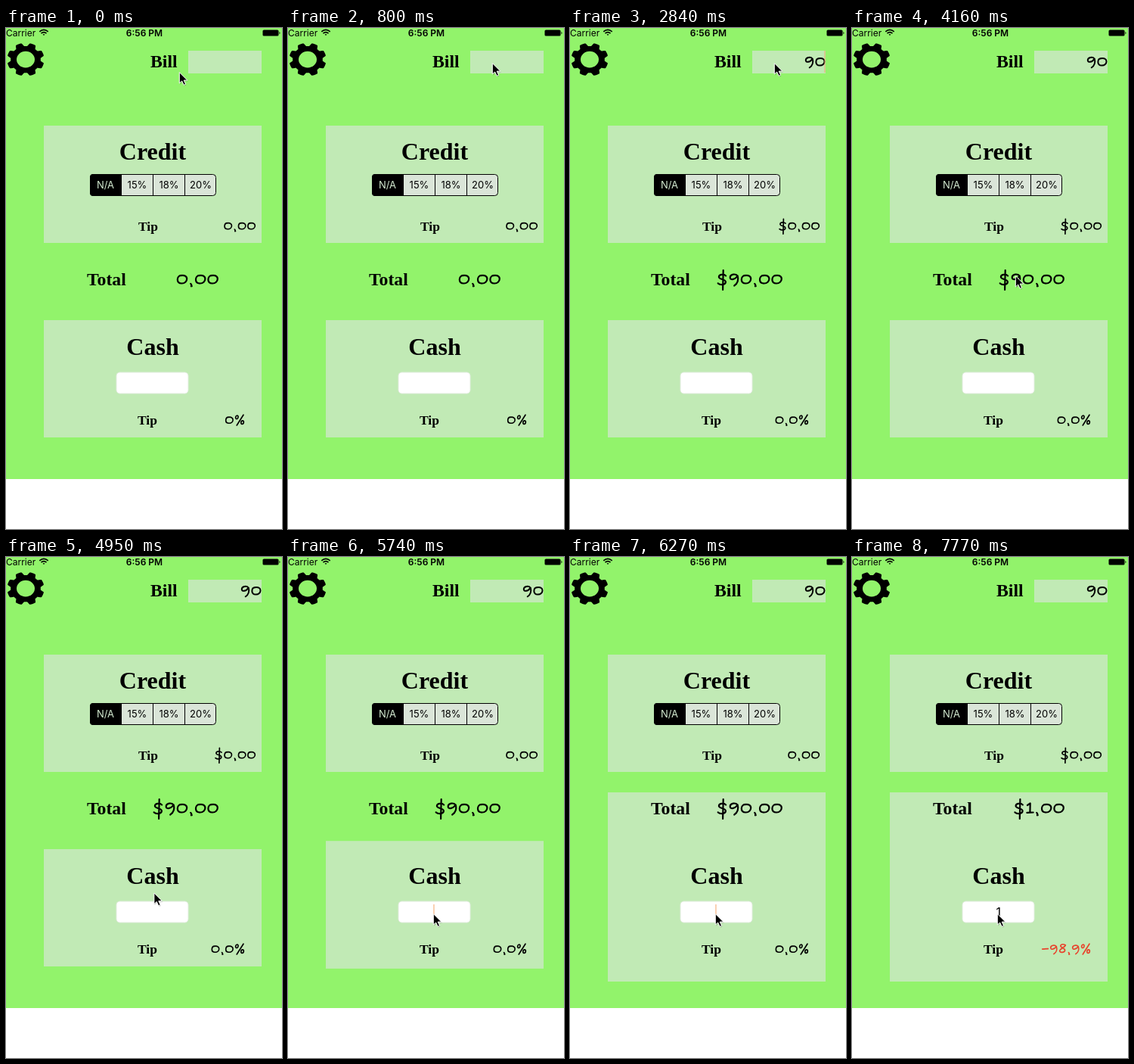
An HTML page for the animation above (8 s loop, 365 by 662 pixels).

```html
<!DOCTYPE html>
<html lang="en">
<head>
<meta charset="utf-8">
<title>Tip calculator</title>
<style>
  html, body { margin: 0; width: 100%; height: 100%; overflow: hidden; background: #fff; }
  svg { display: block; }
  text { font-family: Inter, Roboto, sans-serif; font-size: 12px; }
  .mid { text-anchor: middle; }
  .seg text { font-size: 13px; }
  .title { font: bold 23.7px "Liberation Serif", serif; }
  .big { font-size: 32px; }
  .small { font-size: 17.5px; }
  .hand { fill: none; stroke: #000; stroke-linecap: round; stroke-linejoin: round; }
</style>
</head>
<body>
<svg width="365" height="662" viewBox="0 0 365 662">
  <rect width="365" height="596" fill="#92f36b"/>

  <text x="0" y="10.5">Carrier</text>
  <g fill="none" stroke="#000" stroke-width="1.7">
    <path d="M44.3 4.8Q50 -.2 55.7 4.8M46.5 7.2Q50 4.2 53.5 7.2"/>
    <path d="M48.6 8.6L50 10L51.4 8.6Q50 7.6 48.6 8.6Z" fill="#000" stroke="none"/>
  </g>
  <text class="mid" x="183" y="10.5" font-weight="600">6:56 PM</text>
  <rect x="339.5" y="2.5" width="21" height="8" rx="1.6"/>
  <path d="M361.5 4.7Q363.5 6.5 361.5 8.3Z"/>

  <path id="gear" fill-rule="evenodd"/>

  <g fill="#c1eab5">
    <rect x="241" y="30" width="97" height="30"/>
    <rect x="50" y="129" width="288" height="155"/>
    <rect id="panel" x="50" width="288"/>
  </g>

  <text class="title" x="191" y="52">Bill</text>
  <text class="title big mid" x="194" y="174">Credit</text>
  <text class="title small" x="175" y="268">Tip</text>
  <text class="title" x="107" y="339.5">Total</text>
  <text class="title big mid" x="194" y="432">Cash</text>
  <text class="title small" x="174" y="524">Tip</text>

  <rect x="111.5" y="193.5" width="166" height="28" rx="4" fill="#dae5d8" stroke="#000"/>
  <path d="M153 193V222H115Q111 222 111 218V197Q111 193 115 193ZM194 193h1v29h-1zM236 193h1v29h-1z"/>
  <g class="mid seg">
    <text x="131.5" y="212" fill="#d3ead0">N/A</text>
    <text x="173.5" y="212">15%</text>
    <text x="215.5" y="212">18%</text>
    <text x="257.5" y="212">20%</text>
  </g>

  <rect x="146" y="455" width="95" height="28" rx="4.5" fill="#fff" stroke="#e0ecdd"/>
  <text id="cash" class="mid" x="193.7" y="475" style="font-size:16px"></text>

  <g id="bill" class="hand" role="text"/>
  <g id="tip" class="hand" role="text"/>
  <g id="total" class="hand" role="text"/>
  <g id="percent" class="hand" role="text"/>

  <rect id="billCaret" x="336.3" y="30" width="1.4" height="29" fill="#f2a76b"/>
  <rect id="cashCaret" y="459" width="1.3" height="20" fill="#f7b98c"/>

  <g id="cursor">
    <path d="M1 2V16.5L4.5 13.3L7 18.5L9.4 17.5L7 12.5H12Z" opacity=".18"/>
    <path d="M.3 .6V15L3.7 12L6.1 17.3L8.6 16.2L6.2 11.1H10.8Z" stroke="#fff"/>
  </g>
</svg>
<script>
const LOOP = 8000;
const $ = id => document.getElementById(id);
const clamp = v => Math.max(0, Math.min(1, v));
const part = (t, a, b) => clamp((t - a) / (b - a));
const mix = (a, b, p) => a + (b - a) * p;

// Handwritten glyphs: [advance, stroke path], baseline at y = 0
const glyphs = {
  0: [16.4, 'M7 -11.6C3.5 -11.5 1.8 -8.8 1.8 -6C1.8 -2.6 4.4 -1 7.5 -1C11.4 -1 14.2 -3.8 14.2 -7C14.2 -10.6 10.5 -12.6 5.8 -11.2'],
  1: [12, 'M2.5 -10.5L6.3 -13L6 -1M2 -.6L10.3 -1'],
  8: [15, 'M12 -13.5C8 -16 3.5 -14.5 4 -11.5C4.5 -9 11.5 -8 11.5 -4.2C11.5 -.5 3 .5 2.4 -3C2 -7 11.5 -9 12.5 -13.5'],
  9: [15.3, 'M11.8 -11C9 -14.5 2.2 -13 2 -9C1.8 -5 8 -5.2 12 -11C13.5 -6 12 -.5 7.5 2'],
  '.': [7.8, 'M2.8 -.6L3.8 .6L3.6 2.8L4.4 2.6'],
  '-': [14, 'M1.5 -6.5L11.5 -7'],
  '$': [15.6, 'M12 -11C9 -14 2.6 -13 2.8 -9.3C3 -6 11.8 -7 11.8 -3C11.8 1 5 1.6 1.6 -1.2M8.6 -18.5L8 7.5'],
  '%': [20, 'M5 -14.5C2 -14 1.5 -8.5 4.2 -8.5C7.2 -8.5 8 -14.5 5 -14.5M16 -15.5L4.5 2.6M14.5 -5.5C11.5 -5.5 10.8 .5 13.6 .5C17 .5 17.6 -5.5 14.5 -5.5']
};

// Right-aligned handwriting, rebuilt only when its text changes
function write(id, text, right, base, scale, color = '#000') {
  const g = $(id);
  if (g.getAttribute('aria-label') === text) return;
  g.setAttribute('aria-label', text);
  const chars = [...text].map(c => glyphs[c]);
  const width = chars.reduce((sum, c) => sum + c[0], 0);
  let x = 0;
  g.innerHTML = chars.map(([adv, d]) => {
    const s = `<path d="${d}" transform="translate(${x})"/>`;
    x += adv;
    return s;
  }).join('');
  g.setAttribute('transform', `translate(${right - width * scale} ${base}) scale(${scale})`);
  g.style.stroke = color;
  g.style.strokeWidth = 2.2;
}

function gearPath() {
  let d = '';
  for (let i = 0; i < 200; i++) {
    const a = i * Math.PI / 100;
    const r = 22.2 + 2.4 * Math.max(-1, Math.min(1, .5 - 2.2 * Math.cos(8 * a)));
    d += `${i ? 'L' : 'M'}${(26 + r * Math.cos(a)).toFixed(2)} ${(41.6 + .89 * r * Math.sin(a)).toFixed(2)}`;
  }
  return d + 'ZM14 41.6a12 10.8 0 1 0 24 0a12 10.8 0 1 0 -24 0Z';
}
$('gear').setAttribute('d', gearPath());

// Pointer moves: start, end, target x, target y
const start = [229, 58];
const moves = [
  [140, 800, 270, 46],
  [2870, 3370, 226, 187],
  [3590, 3990, 216, 327],
  [4170, 4430, 203, 386],
  [4740, 5230, 192, 471]
];
function pointer(t) {
  let [x, y] = start;
  for (const [a, b, tx, ty] of moves) {
    const p = 1 - (1 - part(t, a, b)) ** 2;
    x = mix(x, tx, p);
    y = mix(y, ty, p);
  }
  return `translate(${x} ${y})`;
}

// Caret spans: visible from a, fading out between b and c
const billBlinks = [[1250, 1780, 1870], [2220, 2800, 2930], [3330, 3810, 3990], [4390, 4780, 4880], [5290, 5640, 5650]];
const cashBlinks = [[5650, 6400, 6520], [6880, 7560, 7770]];
const blink = (spans, t) => {
  const s = spans.find(([a, , c]) => t >= a && t < c);
  return s ? 1 - part(t, s[1], s[2]) : 0;
};

function draw(t) {
  const typed = t >= 2220, full = t >= 2300, paid = t >= 6880;
  write('bill', full ? '90' : typed ? '9' : '', 338.5, 50.5, .9);
  write('tip', typed && (t < 5650 || paid) ? '$0.00' : '0.00', 331, 266.5, .76);
  write('total', paid ? '$1.00' : full ? '$90.00' : typed ? '$9.00' : '0.00', 282, 338.5, 1);
  write('percent', paid ? '-98.9%' : typed ? '0.0%' : '0%', 317, 523, .76, paid ? '#e8432c' : '#000');
  $('cash').textContent = paid ? '1' : '';

  let p = part(t, 5600, 6190);
  p = p * p * (3 - 2 * p);
  const top = mix(386, 311, p);
  $('panel').setAttribute('y', top);
  $('panel').setAttribute('height', mix(541, 561, p) - top);

  $('billCaret').setAttribute('opacity', blink(billBlinks, t));
  $('cashCaret').setAttribute('opacity', blink(cashBlinks, t));
  $('cashCaret').setAttribute('x', paid ? 196.5 : 192.3);
  $('cursor').setAttribute('transform', pointer(t));
}

const t0 = performance.now();
function tick() {
  draw((performance.now() - t0) % LOOP);
  requestAnimationFrame(tick);
}
tick();
</script>
</body>
</html>
```
